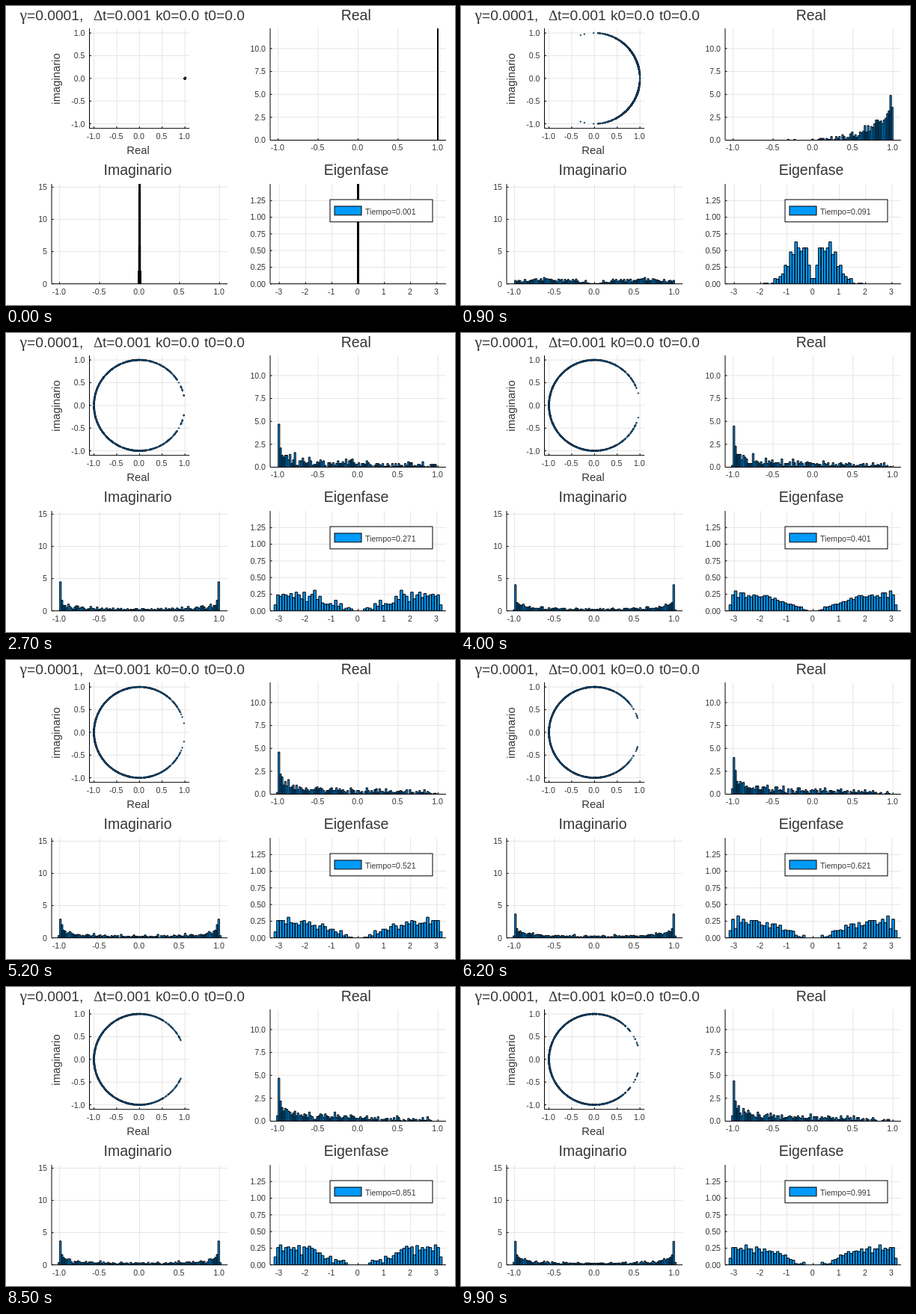
These frames come from a looping animation (600x400 px, 10000 ms). An HTML page:

```html
<!DOCTYPE html>
<html lang="es">
<head>
<meta charset="utf-8">
<title>Eigenfase</title>
<style>
  html, body { margin: 0; width: 100%; height: 100%; overflow: hidden; background: #fff; }
  svg { display: block; }
  text { font-family: "Liberation Sans", Arial, sans-serif; fill: #363636; white-space: pre; }
  .greek { font-family: "Liberation Serif", "Noto Serif", serif; }
  .tick { font-size: 10.6px; }
  .label { font-size: 14.8px; }
  .title { font-size: 19.5px; }
  .head { font-size: 19.2px; }
  .mid { text-anchor: middle; }
  .end { text-anchor: end; }
  .grid { stroke: #e5e5e5; fill: none; }
  .axis { stroke: #000; fill: none; }
  .bars { fill: #009afa; stroke: #000; }
  .dot { fill: #009afa; stroke: #000; stroke-width: .55; }
  .box { fill: #fff; stroke: #000; }
</style>
</head>
<body>
<svg id="stage" width="600" height="400" viewBox="0 0 600 400"></svg>
<script>
const stage = document.getElementById('stage');
const { PI, abs, min, max, floor, sin, cos } = Math;

function add(tag, attrs, parent = stage) {
  const node = document.createElementNS('http://www.w3.org/2000/svg', tag);
  for (const key in attrs) node.setAttribute(key, attrs[key]);
  parent.append(node);
  return node;
}

function write(str, x, y, cls, extra = {}) {
  const node = add('text', { x, y, class: cls, ...extra });
  node.textContent = str;
  return node;
}

const range = (a, b, step) =>
  Array.from({ length: Math.round((b - a) / step) + 1 }, (_, i) => a + i * step);

// A plot with symmetric x limits; yLow and yHigh bound the y axis.
function panel({ x, y, w, h, xLim, yLow, yHigh, xTicks, yTicks, xDigits, yDigits }) {
  const px = v => x + w / 2 + v * w / (2 * xLim);
  const py = v => y + h - (v - yLow) * h / (yHigh - yLow);
  let grid = '', axis = `M${x} ${y}V${y + h}H${x + w}`;
  for (const v of xTicks) {
    grid += `M${px(v)} ${y}v${h}`;
    axis += `M${px(v)} ${y + h}v-2.5`;
    write(v.toFixed(xDigits), px(v) - .8, y + h + 13.8, 'tick mid');
  }
  for (const v of yTicks) {
    grid += `M${x} ${py(v)}h${w}`;
    axis += `M${x} ${py(v)}h2.5`;
    write(v.toFixed(yDigits), x - 6, py(v) + 3.9, 'tick end');
  }
  add('path', { d: grid, class: 'grid' });
  add('path', { d: axis, class: 'axis' });
  const clip = add('svg', { x, y, width: w + 1, height: h + .5, viewBox: `${x} ${y} ${w + 1} ${h + .5}` });
  return { px, py, clip, bars: add('path', { class: 'bars' }, clip) };
}

const unit = range(-1, 1, .5);
const circle = panel({ x: 111.5, y: 30, w: 133.7, h: 133.7, xLim: 1.1, yLow: -1.1, yHigh: 1.1,
  xTicks: unit, yTicks: unit, xDigits: 1, yDigits: 1 });
const real = panel({ x: 353, y: 30, w: 235, h: 149.5, xLim: 1.1, yLow: 0, yHigh: 12.2,
  xTicks: unit, yTicks: range(0, 10, 2.5), xDigits: 1, yDigits: 1 });
const imag = panel({ x: 61, y: 238, w: 235, h: 133.7, xLim: 1.1, yLow: 0, yHigh: 15.5,
  xTicks: unit, yTicks: range(0, 15, 5), xDigits: 1, yDigits: 0 });
const phase = panel({ x: 353, y: 238, w: 235, h: 133.7, xLim: 3.348, yLow: 0, yHigh: 1.5,
  xTicks: range(-3, 3, 1), yTicks: range(0, 1.25, .25), xDigits: 0, yDigits: 2 });

write('γ', 18.5, 19, 'greek', { 'font-size': 21.5 });
write('=0.0001,', 28, 19, 'head');
write('Δ', 117, 19, 'head greek');
write('t=0.001', 129, 19, 'head');
write('k0=0.0', 200, 19, 'head');
write('t0=0.0', 265, 19, 'head');
write('Real', 467.7, 19, 'title mid');
write('Imaginario', 176, 226, 'title mid');
write('Eigenfase', 468, 226, 'title mid');
write('Real', 176.5, 197.5, 'label mid');
write('imaginario', 0, 0, 'label mid', { transform: 'translate(71.5 97.5) rotate(-90)' });

add('rect', { x: 433, y: 259, width: 137, height: 29.8, class: 'box' });
add('rect', { x: 439, y: 267.9, width: 36, height: 11.9, class: 'bars' });
const clock = write('', 480, 278.8, 'tick');

// Phase densities: the early spread in steps of 0.1, later stages in steps of 0.2.
const early = [10, 27, 52, 54, 52, 50, 61, 48, 46, 27, 25, 14, 10, 10, 5, 2, 1, 1, 1];
const stages = [
  { at: 27, dens: [0, 3, 5, 7, 12, 9, 12, 16, 28, 18, 21, 21, 22, 23, 22, 22] },
  { at: 52, dens: [0, 1, 3, 8, 12, 12, 16, 18, 18, 21, 23, 21, 21, 26, 24, 24] },
  { at: 72, dens: [0, 1, 2, 6, 10, 13, 17, 22, 17, 18, 25, 29, 24, 28, 24, 23] },
  { at: 85, dens: [0, 1, 3, 7, 7, 11, 13, 18, 26, 28, 23, 25, 27, 28, 27, 28] },
  { at: 99, dens: [0, 1, 1, 5, 10, 15, 19, 20, 21, 22, 26, 22, 27, 25, 25, 27] }
];

let seed = 7;
const random = () => (seed = seed * 16807 % 2147483647) / 2147483647;

const PAIRS = 500;
const levels = Array.from({ length: PAIRS }, (_, i) => ({
  rank: (i * 187 % PAIRS + .5) / PAIRS,
  shift: random() * 2 * PI,
  rate: .1 + random() * .5
}));
const dots = Array.from({ length: 2 * PAIRS }, () => add('circle', { r: .85, class: 'dot' }, circle.clip));

function wobble(n) {
  return levels.map(({ rank, shift, rate }) => {
    const u = abs(rank + 11 / PAIRS * sin(shift + rate * n));
    return u > 1 ? 2 - u : u;
  });
}

function quantiles(dens, step, ranks) {
  const mass = dens.map((d, i) => d * (min(PI, (i + 1) * step) - i * step));
  const total = mass.reduce((a, b) => a + b);
  return ranks.map(u => {
    let m = u * total, i = 0;
    while (i < mass.length - 1 && m > mass[i]) m -= mass[i++];
    return min(PI, i * step + m / dens[i]);
  });
}

function phasesAt(n, t) {
  const ranks = wobble(n);
  const k = max(0, stages.findIndex(s => s.at >= n) - 1);
  const a = stages[k], b = stages[k + 1];
  const mix = max(0, (n - a.at) / (b.at - a.at));
  const late = quantiles(a.dens.map((d, i) => d + (b.dens[i] - d) * mix), .2, ranks);
  if (n >= 27) return late;

  const growth = (t / .091) ** 1.1;
  const grown = quantiles(early, .1, ranks).map(q => {
    const v = q * growth % (2 * PI);
    return v > PI ? 2 * PI - v : v;
  });
  if (n <= 9) return grown;

  // Folded phases meet the later spread rank by rank.
  const w = ((n - 9) / 18) ** 2;
  const asc = (p, q) => p - q;
  grown.sort(asc);
  late.sort(asc);
  const blend = grown.map((v, i) => v + (late[i] - v) * w);
  return levels.map(l => blend[floor(l.rank * PAIRS)]);
}

function niceStep(raw) {
  const p = 10 ** floor(Math.log10(raw));
  const r = raw / p;
  return p * (r <= 1.1 ? 1 : r <= 2.2 ? 2 : r <= 5.5 ? 5 : 10);
}

function histogram({ px, py, bars }, values, bins) {
  const step = niceStep((max(...values) - min(...values)) / bins);
  const counts = new Map();
  for (const v of values) {
    const k = floor(v / step + 1e-9);
    counts.set(k, (counts.get(k) || 0) + 1);
  }
  let d = '';
  for (const [k, c] of counts) {
    const top = py(c / (values.length * step));
    d += `M${px(k * step).toFixed(2)} ${py(0)}V${top.toFixed(2)}H${px((k + 1) * step).toFixed(2)}V${py(0)}Z`;
  }
  bars.setAttribute('d', d);
}

function draw(n) {
  const t = (1 + 10 * n) / 1000;
  const angles = phasesAt(n, t).flatMap(a => [a, -a]);
  const radius = 1 + .0004 * max(0, t - .3);
  const re = angles.map(a => radius * cos(a));
  const im = angles.map(a => radius * sin(a));
  dots.forEach((dot, i) => {
    dot.setAttribute('cx', circle.px(re[i]).toFixed(2));
    dot.setAttribute('cy', circle.py(im[i]).toFixed(2));
  });
  histogram(real, re, 100);
  histogram(imag, im, 100);
  histogram(phase, angles, 60);
  clock.textContent = 'Tiempo=' + t.toFixed(3);
}

const start = performance.now();
let shown = -1;
function tick() {
  const n = floor((performance.now() - start) / 100) % 100;
  if (n !== shown) draw(shown = n);
  requestAnimationFrame(tick);
}
tick();
</script>
</body>
</html>
```
